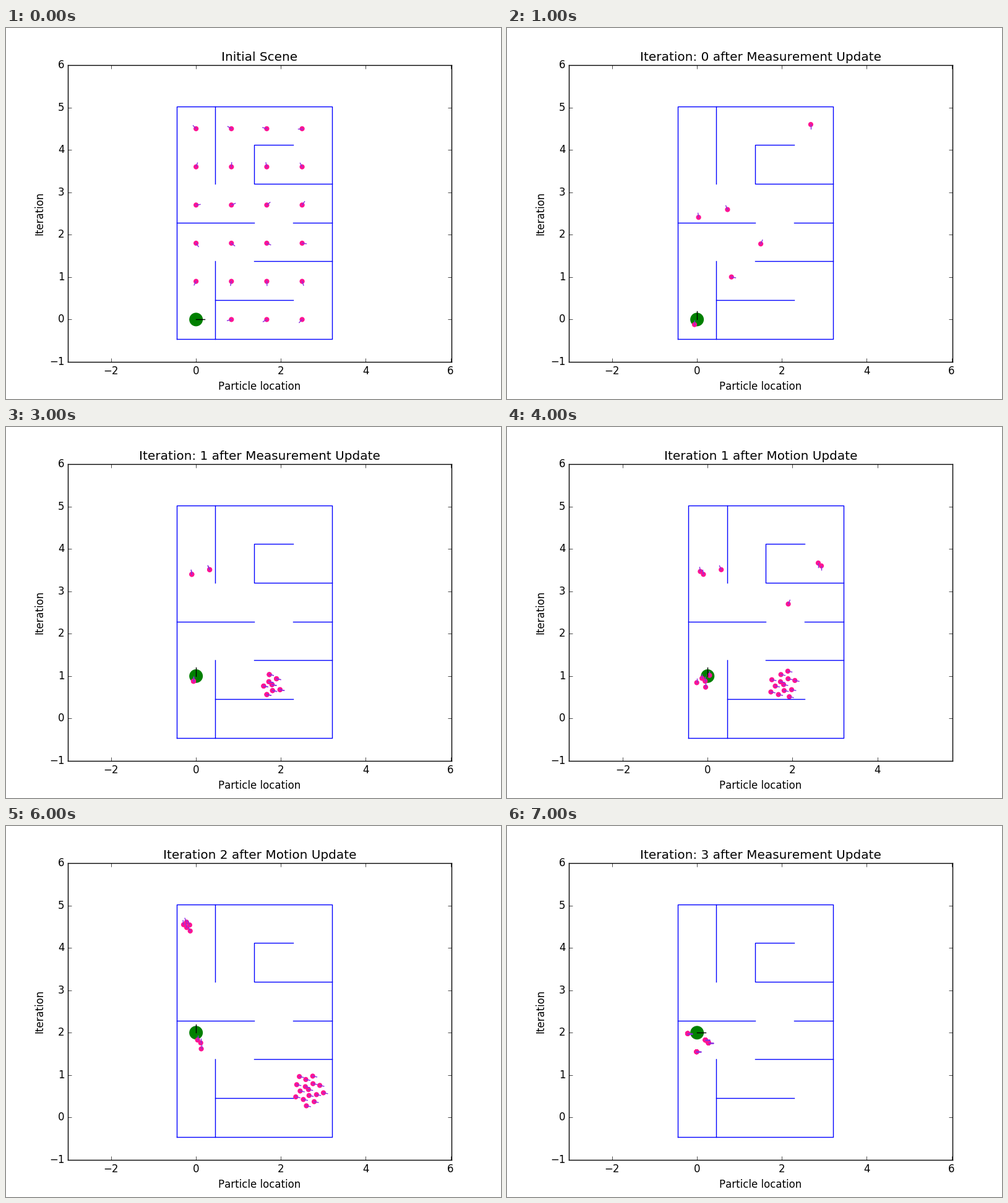
Recreate the animation shown at these times as a matplotlib script. Size 800 by 600 pixels, loop 8000 ms.

```python
import numpy as np
import matplotlib.pyplot as plt
from matplotlib.animation import FuncAnimation

plt.style.use("classic")
plt.rcParams.update({
    "font.sans-serif": ["DejaVu Sans"],
    "text.kerning_factor": 6,
    "savefig.dpi": "figure",
})

COUNT = 24
CELL = 0.9144
SPREAD = 0.1
GOLDEN = np.pi * (3 - np.sqrt(5))

# Wall paths through the corners of the 4 by 6 cell maze
WALLS = [
    [(0, 0), (4, 0), (4, 6), (0, 6), (0, 0)],
    [(4, 4), (2, 4), (2, 5), (3, 5)],
    [(1, 0), (1, 2)], [(1, 1), (3, 1)], [(2, 2), (4, 2)],
    [(0, 3), (2, 3)], [(3, 3), (4, 3)], [(1, 4), (1, 6)],
]


def cloud(x, y, deg, n):
    """Particles with one heading, spiralling out from a centre."""
    k = np.arange(n)
    r, a = SPREAD * np.sqrt(k), GOLDEN * k
    return np.column_stack([x + r * np.cos(a), y + r * np.sin(a), np.full(n, deg)])


def moved(groups):
    return np.vstack([cloud(x, y, deg, n) for x, y, deg, n, _ in groups])


def measured(groups):
    kept = np.vstack([cloud(x, y, deg, n) for x, y, deg, _, n in groups])
    return np.resize(kept, (COUNT, 3))


gx, gy = np.meshgrid(np.linspace(0, 2.5, 4), np.linspace(0, 4.5, 6))
start = np.column_stack([gx.ravel(), gy.ravel(), np.linspace(-180, 180, COUNT)])
start[0, 2] = 0

turned = start + [0, 0, 90]
turned[:, :2] += np.random.default_rng(5).normal(0, 0.13, (COUNT, 2))

survivors = [0, 5, 10, 12, 13, 23]
up, east, northeast, north, northwest, south = turned[survivors, 2]

# Groups: centre x, y, heading, particles after motion, particles kept
first = [
    (-0.06, 0.88, up, 5, 1), (1.79, 0.80, east, 13, 8),
    (1.90, 2.70, northeast, 1, 0), (-0.10, 3.40, north, 2, 1),
    (0.32, 3.51, northwest, 1, 1), (2.68, 3.60, south, 2, 0),
]
second = [
    (0.11, 1.76, up, 3, 2), (2.65, 0.66, east, 16, 11),
    (-0.22, 4.48, north, 2, 1), (-0.15, 4.54, northwest, 3, 1),
]
third = [(-0.22, 1.98, 0, 1, 1), (0.27, 1.76, 0, 2, 2), (-0.01, 1.55, 0, 1, 1)]

# Each survivor sits one step behind the centre of its next group
for i, (x, y, deg, *_) in zip(survivors, first):
    a = np.radians(deg)
    turned[i, :2] = x - np.cos(a), y - np.sin(a)

MOTION = "Iteration {} after Motion Update"
MEASURE = "Iteration: {} after Measurement Update"

# Title, particles, robot y, robot heading, centre of the x axis
SCENES = [
    ("Initial Scene", start[1:], 0, 0, 1.5),
    (MEASURE.format(0), turned[survivors], 0, 90, 1.5),
    (MOTION.format(0), turned, 0, 90, 1.5),
    (MEASURE.format(1), measured(first), 1, 90, 1.5),
    (MOTION.format(1), moved(first), 1, 90, 1.25),
    (MEASURE.format(2), measured(second), 2, 90, 1.5),
    (MOTION.format(2), moved(second), 2, 90, 1.5),
    (MEASURE.format(3), measured(third), 2, 0, 1.5),
]

fig, ax = plt.subplots(figsize=(8, 6), dpi=100, facecolor="white")


def draw_poses(x, y, deg, size, length, fill, stroke):
    a = np.radians(deg)
    ax.scatter(x, y, s=size, color=fill, edgecolors="none")
    ax.plot([x, x + length * np.cos(a)], [y, y + length * np.sin(a)], color=stroke)


def update(i):
    title, particles, robot_y, robot_deg, centre = SCENES[i]
    ax.clear()
    for path in WALLS:
        ax.plot(*((np.array(path) - 0.5) * CELL).T, color="blue")
    draw_poses(0, robot_y, robot_deg, 250, 0.2, "green", "black")
    draw_poses(*particles.T, 35, 0.1, "deeppink", "blueviolet")
    ax.set_xticks(range(-2, 7, 2))
    ax.set_yticks(range(-1, 7))
    half = 7 * 620 / 480 / 2
    ax.set_xlim(centre - half, centre + half)
    ax.set_ylim(-1, 6)
    ax.set_title(title)
    ax.set_xlabel("Particle location", labelpad=5.2)
    ax.set_ylabel("Iteration")
    return []


anim = FuncAnimation(fig, update, frames=len(SCENES), init_func=lambda: update(0),
                     interval=1000, repeat=True, repeat_delay=0, blit=False)
plt.show()
```
